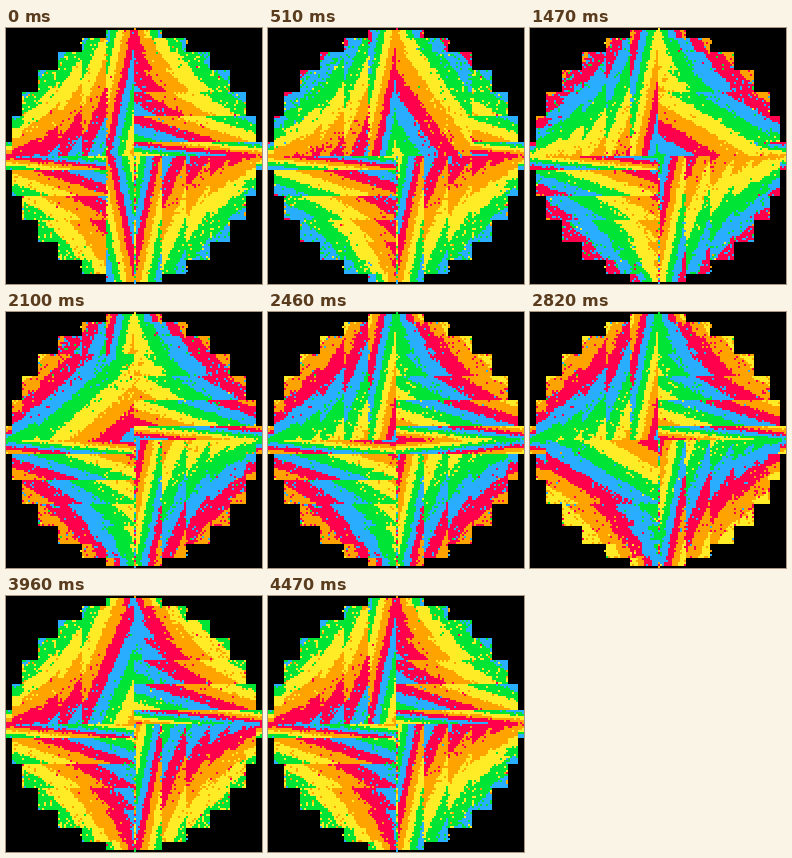
Animation, 256 px wide and 256 px high, one loop 4.5 s. Source, as an HTML page with a canvas:

```html
<!DOCTYPE html>
<html lang="en">
<head>
<meta charset="utf-8">
<title>Spinning dust</title>
<style>
html, body { margin: 0; width: 100%; height: 100%; overflow: hidden; background: #000; }
canvas { display: block; width: 256px; height: 256px; image-rendering: pixelated; }
</style>
</head>
<body>
<canvas id="stage" width="128" height="128"></canvas>
<script>
const SIZE = 128, MID = 64;
const STEP_MS = 30, STEPS = 150, TURN = 30;
const DOTS = 4000, BANDS = 4;

const ctx = document.getElementById('stage').getContext('2d');
const image = ctx.createImageData(SIZE, SIZE);
const pixels = new Uint32Array(image.data.buffer);

// red, orange, yellow, green, blue as little-endian ABGR
const palette = [0xff004d, 0xffa300, 0xffec27, 0x00e436, 0x29adff]
  .map(c => (0xff000000 | (c & 255) << 16 | (c & 0xff00) | c >> 16) >>> 0);

function random(seed) {
  return () => {
    seed = (seed + 0x6d2b79f5) | 0;
    let t = Math.imul(seed ^ (seed >>> 15), 1 | seed);
    t = (t + Math.imul(t ^ (t >>> 7), 61 | t)) ^ t;
    return ((t ^ (t >>> 14)) >>> 0) / 4294967296;
  };
}

// Scatter dots over the box between the centre and a point on the circle.
function scatter(step) {
  const n = ((step % STEPS) + STEPS) % STEPS;
  const turns = (n + 1) / TURN;
  const part = (n + 1) % TURN / TURN * 2 * Math.PI;
  const w = -Math.sin(part) * MID;
  const h = Math.cos(part) * MID;
  const rnd = random(n * 7919 + 17);
  for (let i = 0; i < DOTS; i++) {
    const u = rnd(), v = rnd();
    const x = Math.floor(MID + u * w + 1e-9);
    const y = Math.floor(MID + v * h + 1e-9);
    if (x < 0 || y < 0 || x >= SIZE || y >= SIZE) continue;
    const band = Math.floor(BANDS * (u + v) + turns + 2) % palette.length;
    pixels[y * SIZE + x] = palette[band];
  }
}

let last = -Infinity;

function show(step) {
  if (step === last) return;
  // A full loop of history is enough to rebuild the picture.
  for (let s = Math.max(last + 1, step - STEPS); s <= step; s++) scatter(s);
  last = step;
  ctx.putImageData(image, 0, 0);
}

pixels.fill(0xff000000);
show(0);
const start = performance.now();

function tick() {
  show(Math.floor((performance.now() - start) / STEP_MS));
  requestAnimationFrame(tick);
}
requestAnimationFrame(tick);
</script>
</body>
</html>
```
